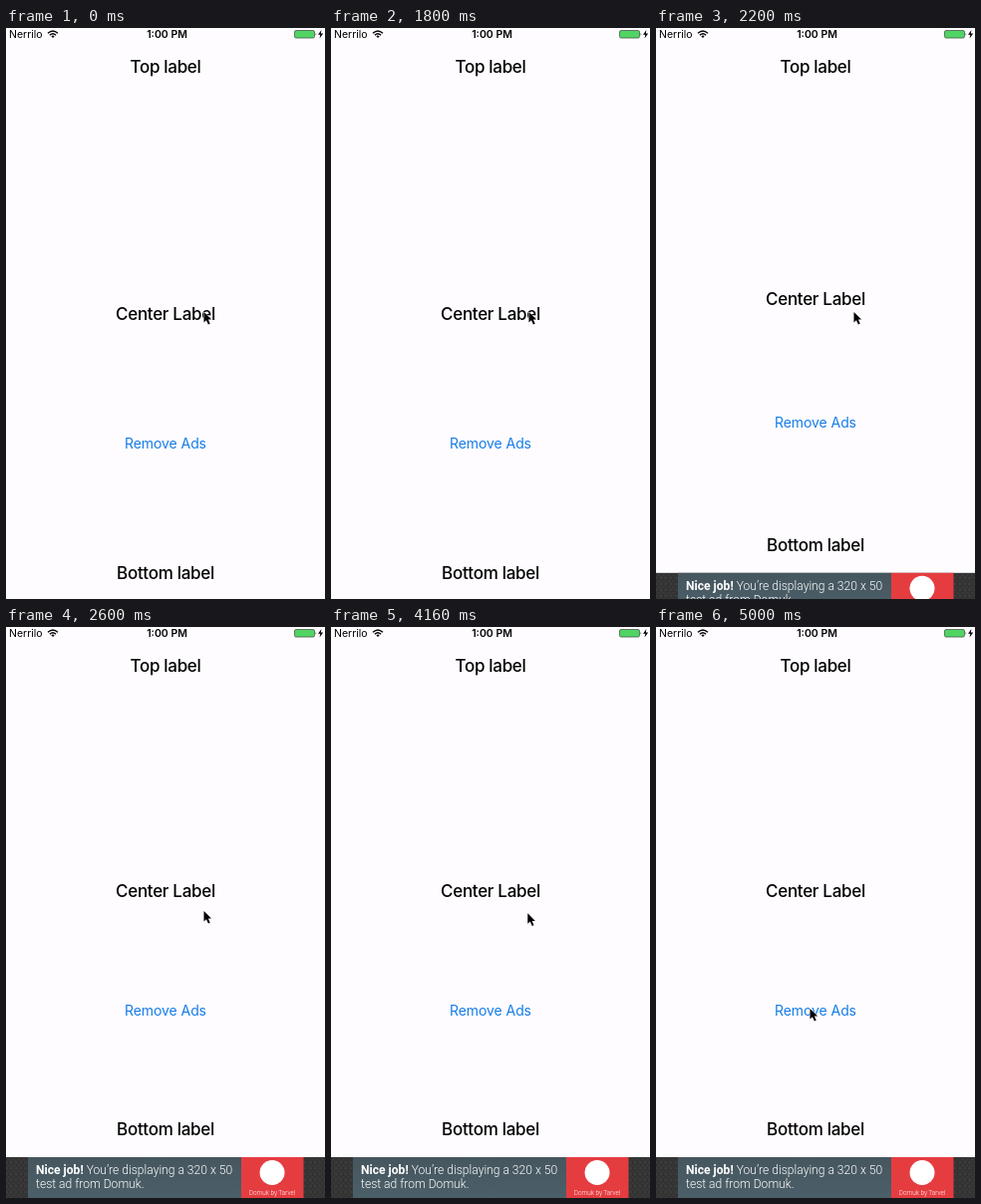
An HTML page for the animation above (5.04 s loop, 320 by 573 pixels).

```html
<!DOCTYPE html>
<html lang="en">
<head>
<meta charset="utf-8">
<style>
  html, body { margin: 0; height: 100%; overflow: hidden; background: #fefcff; }
  svg { display: block; width: 320px; height: 573px; }
  text { font-family: Inter, sans-serif; }
  .label { font-size: 17px; font-weight: 500; letter-spacing: -.3px; text-anchor: middle; }
  .button { font-size: 14px; letter-spacing: -.08px; text-anchor: middle; fill: #157ce6; }
  .status { font-size: 10.5px; }
  .ad text { font-family: Roboto, sans-serif; font-weight: 300; font-size: 12.1px; fill: #fff; }
  .ad .bold { font-weight: 700; }
  .ad .small { font-size: 6.4px; text-anchor: middle; }
</style>
</head>
<body>
<svg viewBox="0 0 320 573">
  <defs>
    <pattern id="mesh" width="5" height="6" patternUnits="userSpaceOnUse">
      <rect width="5" height="6" fill="#3b3b3b"/>
      <path d="M0 1L2.5 2.5L5 1M2.5 2.5V5M0 6L2.5 5L5 6M0 0V1" fill="none" stroke="#2b2b2b"/>
    </pattern>
    <linearGradient id="slate" x2="0" y2="1">
      <stop stop-color="#46565f"/>
      <stop offset="1" stop-color="#4c6069"/>
    </linearGradient>
  </defs>

  <text class="status" x="3" y="10">Nerrilo</text>
  <g fill="none" stroke="#000" stroke-width="1.4">
    <path d="M42 5.2Q47 .6 52 5.2M43.9 7.2Q47 4.4 50.1 7.2"/>
    <path d="M45.4 8.3Q47 6.9 48.6 8.3L47 10z" fill="#000" stroke="none"/>
  </g>
  <text class="status" x="161.5" y="10" text-anchor="middle" font-weight="600">1:00 PM</text>
  <rect x="289.5" y="2.5" width="20" height="7.5" rx="1.5" fill="#50d464" stroke="#4b5a4d" stroke-width=".8"/>
  <path d="M310.6 4.8Q312 6.2 310.6 7.7z" fill="#333"/>
  <path d="M316.4 2L313 6.7H315.3L314.5 10.5L318.2 5.5H315.8z"/>

  <text class="label" x="160" y="45.3">Top label</text>
  <text class="label" x="160" y="292.5" data-rise="21.5">Center Label</text>
  <text class="button" x="160" y="422.4" data-rise="32.5">Remove Ads</text>
  <text class="label" x="160" y="553.2" data-rise="43">Bottom label</text>

  <g class="ad" data-rise="42.5">
    <rect y="574.5" width="320" height="43" fill="url(#mesh)"/>
    <rect x="22" y="574.5" width="214" height="43" fill="url(#slate)"/>
    <rect x="236" y="574.5" width="62.5" height="43" fill="#e53c40"/>
    <text x="30" y="591.8"><tspan class="bold">Nice job!</tspan> You’re displaying a 320 x 50</text>
    <text x="30" y="605.8">test ad from Domuk.</text>
    <circle cx="267" cy="590" r="12.5" fill="#fff"/>
    <text class="small" x="267" y="612.8">Domuk by Tarvel</text>
  </g>

  <path id="cursor" d="M0 0V10.4L2.4 8.2L4.4 12.6L6.2 11.8L4.4 7.6H7.6z" stroke="#fff" stroke-width=".9" paint-order="stroke"/>
</svg>
<script>
  const LOOP = 5040;
  const risers = document.querySelectorAll('[data-rise]');
  const cursor = document.getElementById('cursor');

  // Smooth 0..1 progress between two times
  function ease(time, start, end) {
    const p = Math.min(1, Math.max(0, (time - start) / (end - start)));
    return p * p * (3 - 2 * p);
  }

  function move(element, x, y) {
    element.setAttribute('transform', `translate(${x} ${y})`);
  }

  function draw(now) {
    const time = now % LOOP;
    const shown = ease(time, 1960, 2360);
    for (const item of risers) move(item, 0, -item.dataset.rise * shown);

    const path = ease(time, 4080, 4960);
    move(cursor, 198.5 - 44 * path - 2 * Math.sin(Math.PI * path), 285 + 98 * path);
    requestAnimationFrame(draw);
  }
  requestAnimationFrame(draw);
</script>
</body>
</html>
```
